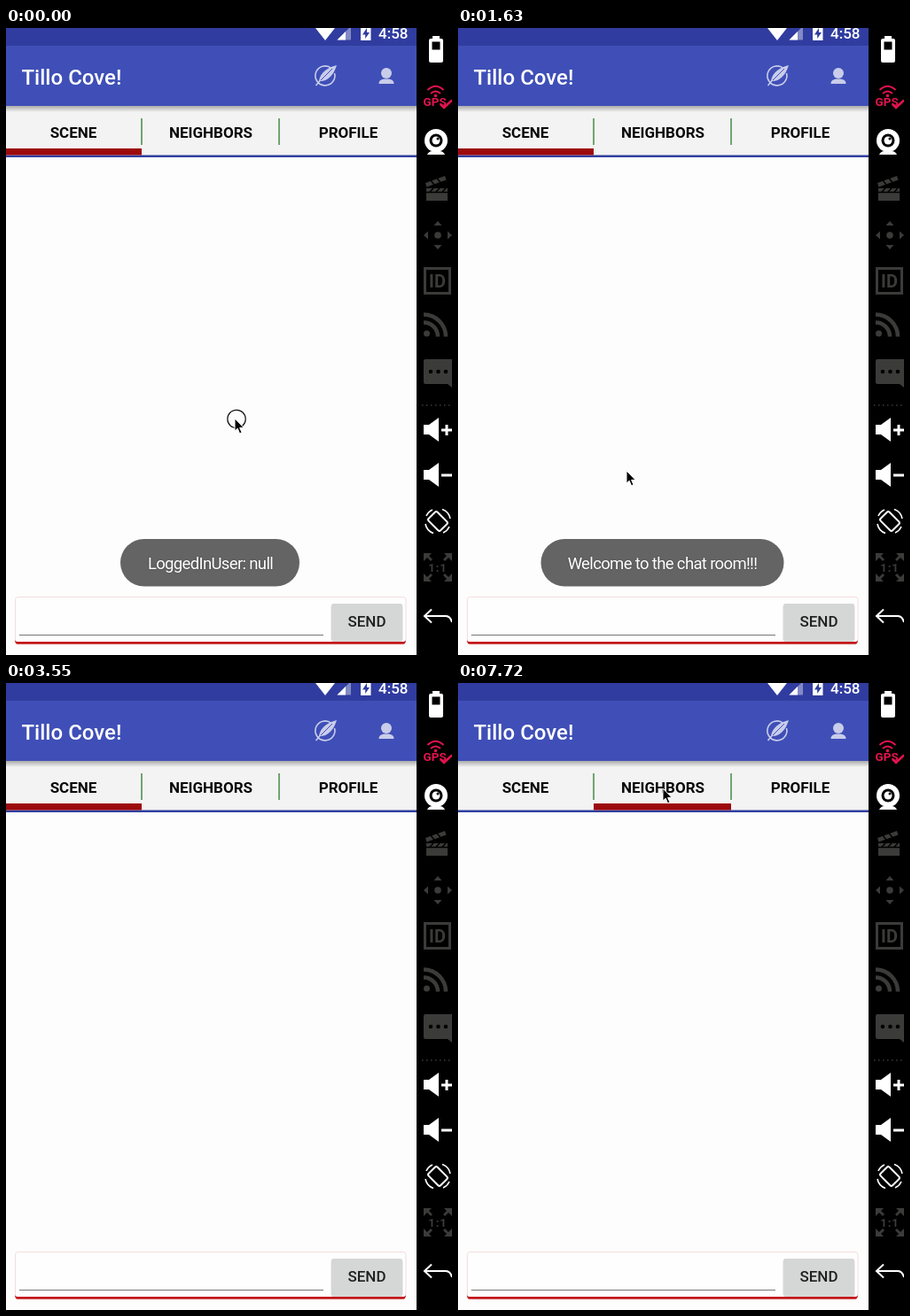
An HTML page that plays this animation: 503x708 px, repeating every 8 s.

```html
<!DOCTYPE html>
<html lang="en">
<head>
<meta charset="utf-8">
<title>Chat app</title>
<style>
  html, body { margin: 0; width: 100%; height: 100%; overflow: hidden; background: #fdfdfd; }
  svg { display: block; width: 503px; height: 708px; font-family: Roboto, "Open Sans", sans-serif; }
  .tab { font-weight: 700; font-size: 17px; text-anchor: middle; fill: #0a0a0a; }
  .toast rect { fill: #646464; }
  .toast text { font-size: 18.5px; letter-spacing: -.65px; text-anchor: middle; fill: #fff; text-shadow: 0 0 2px rgba(0,0,0,.35); }
  .line { fill: none; stroke: currentColor; }
  .white { color: #fff; fill: #fff; }
  .dim { color: #3b3b39; fill: #3b3b39; }
</style>
</head>
<body>
<svg viewBox="0 0 503 708">
  <defs>
    <linearGradient id="drop" x2="0" y2="1">
      <stop offset="0" stop-color="#000" stop-opacity=".3"/>
      <stop offset="1" stop-color="#000" stop-opacity="0"/>
    </linearGradient>
    <path id="speaker" d="M471 -6h6l11 -8v27l-11 -8h-6z"/>
    <path id="tri" d="M-4.5 -11L0 -16L4.5 -11z"/>
  </defs>
  <rect width="463" height="708" fill="#fdfdfd"/>

  <!-- tabs -->
  <rect y="88" width="463" height="56" fill="#f3f3f3"/>
  <rect id="press" x="153" y="88" width="155" height="56" fill="#000" opacity="0"/>
  <rect y="143.5" width="463" height="2.5" fill="#303f9f"/>
  <rect id="bar" y="136" width="153" height="7.5" fill="#9c0a0c"/>
  <path d="M153 102v30M308 102v30" stroke="#4f9152" stroke-width="1.6"/>
  <text class="tab" x="76" y="124">SCENE</text>
  <text class="tab" x="231" y="124">NEIGHBORS</text>
  <text class="tab" x="386" y="124">PROFILE</text>

  <!-- app bar -->
  <rect y="88" width="463" height="7" fill="url(#drop)"/>
  <rect width="463" height="88" fill="#3f4fb7"/>
  <rect width="463" height="20" fill="#303c9f"/>
  <text x="17.5" y="64" font-size="24" font-weight="500" fill="#fff">Tillo Cove!</text>
  <g fill="#fff">
    <path d="M349 0h22l-11 14z"/>
    <path d="M389 0v13.5h-15.500l13.500 -13.500z" opacity=".4"/>
    <path d="M383 4v9.500h-9.500z"/>
    <path d="M400 0h11.500v14h-11.500z"/>
    <path d="M407 0l-5 7.500h3.200v4.500l4.800 -7h-3z" fill="#303c9f"/>
    <text x="420" y="12" font-size="17" font-weight="500">4:58</text>
  </g>
  <g fill="#c9cdea" color="#c9cdea">
    <path class="line" d="M367 45.500A11 11 0 1 0 370.500 51" stroke-width="1.6"/>
    <path d="M373 42C364 44 354 50 353 60C361 61 369 55 373 42z"/>
    <path class="line" d="M349.500 65L356 57" stroke-width="1.6"/>
    <path d="M355 59L368 46" stroke="#3f4fb7" stroke-width="1"/>
    <circle cx="429" cy="51" r="6"/>
    <path d="M420.500 63c0 -4 3 -5.500 8.500 -5.500s8.500 1.500 8.500 5.500z"/>
    <path class="line" d="M425 52q4 5 8 0" stroke="#3f4fb7"/>
  </g>

  <!-- message box -->
  <rect x="10.500" y="642.500" width="440.500" height="52" rx="3" fill="#fefefe" stroke="#f5dcdc"/>
  <path d="M10 690q0 5.800 3 5.800h435q3 0 3 -5.800q0 3 -3 3h-435q-3 0 -3 -3z" fill="#c4161a"/>
  <path d="M15 685.500h343" stroke="#777"/>
  <rect x="366.500" y="651" width="81" height="42" rx="3" fill="#000" opacity=".15"/>
  <rect x="367" y="650" width="80" height="41" rx="2" fill="#d5d7d6"/>
  <text x="407" y="676" font-size="17" font-weight="500" text-anchor="middle" fill="#202020">SEND</text>

  <g class="toast" id="login">
    <rect x="129" y="577" width="202" height="53.500" rx="26.700"/>
    <text x="230.500" y="611">LoggedInUser: null</text>
  </g>
  <g class="toast" id="hello">
    <rect x="93.500" y="577" width="274" height="53.500" rx="26.700"/>
    <text x="230.500" y="611">Welcome to the chat room!!!</text>
  </g>

  <!-- device controls -->
  <rect x="463" width="40" height="708"/>
  <g class="white">
    <rect x="481" y="9" width="8" height="4"/>
    <rect x="477" y="12" width="16" height="27" rx="2"/>
    <rect x="480.500" y="15.500" width="9" height="9" fill="#000"/>
    <circle cx="485" cy="127" r="13"/>
    <circle cx="485" cy="127" r="7.500" fill="#000"/>
    <circle cx="485" cy="127" r="4.500"/>
    <circle cx="487" cy="125" r="1.500" fill="#000"/>
    <path d="M475 143q2 -4 6 -4h8q4 0 6 4z"/>
    <use href="#speaker" y="454"/>
    <path class="line" d="M491 454h12M497 448v12M491 505h12" stroke-width="3"/>
    <use href="#speaker" y="505"/>
    <g class="line" stroke-width="2">
      <rect x="480" y="547.500" width="14" height="19" rx="2" transform="rotate(-45 487 557)"/>
      <path d="M473 560a14 14 0 0 0 9 10.500M501 554a14 14 0 0 0 -9 -10.500M474 551a14 14 0 0 1 7 -7M500 563a14 14 0 0 1 -7 7" stroke-width="1.600"/>
      <path d="M480 656.500l-8 7.500l8 7.500M472 664h24q5 0 7 7"/>
    </g>
  </g>
  <g fill="#e3134f" color="#e3134f">
    <path class="line" d="M475.500 70q9 -8.500 18 0M479 74q5.500 -5 11 0" stroke-width="2"/>
    <circle cx="484.500" cy="76.500" r="1.800"/>
    <text x="470.500" y="88" font-size="13.500" font-weight="700">GPS</text>
    <path class="line" d="M490 86l4 4l9 -8.500" stroke="#9fc31a" stroke-width="2.600"/>
  </g>
  <g class="dim">
    <path d="M474 181h24v14h-24zM473 175l22 -8l1.500 4.500l-22 8z"/>
    <path d="M479 172l4 5M486 169.500l4 5M478 185l4 -4M485 185l4 -4M492 185l4 -4M474 185.500h24" stroke="#000" stroke-width="1.500"/>
    <g transform="translate(487 234)">
      <circle r="3.800"/>
      <use href="#tri"/>
      <use href="#tri" transform="rotate(90)"/>
      <use href="#tri" transform="rotate(180)"/>
      <use href="#tri" transform="rotate(270)"/>
    </g>
    <rect class="line" x="472.500" y="271.500" width="28" height="28" stroke-width="3"/>
    <text x="486.500" y="293" font-size="20" font-weight="700" text-anchor="middle">ID</text>
    <circle cx="474.500" cy="345" r="3.500"/>
    <path class="line" d="M471 332.500a16 16 0 0 1 16 16M471 323.500a25 25 0 0 1 25 25" stroke-width="4.500"/>
    <path d="M473 374h30v32l-5 -4h-25q-2 0 -2 -2v-24q0 -2 2 -2z"/>
    <g fill="#000">
      <circle cx="479" cy="388" r="2.300"/><circle cx="487.500" cy="388" r="2.300"/><circle cx="496" cy="388" r="2.300"/>
    </g>
    <path class="line" d="M469 426h34" stroke-width="1.500" stroke-dasharray="1.500 3.500"/>
    <path d="M471 593h9l-3 3l4 4l-2 2l-4 -4l-4 4zM503 593h-9l3 3l-4 4l2 2l4 -4l4 4zM471 625h9l-3 -3l4 -4l-2 -2l-4 4l-4 -4zM503 625h-9l3 -3l-4 -4l2 -2l4 4l4 -4z"/>
    <text x="487" y="614" font-size="13" font-weight="700" text-anchor="middle" letter-spacing="1">1:1</text>
  </g>

  <g id="mouse">
    <circle id="tap" cx="2" cy=".5" r="10.200" fill="none" stroke="#111" stroke-width="1.200"/>
    <path d="M0 0v14.200l3.200 -3l2.300 5.600l2.500 -1l-2.400 -5.400h4.600z" fill="#000" stroke="#fff" stroke-width="1"/>
  </g>
</svg>
<script>
const LOOP = 8000;
const $ = id => document.getElementById(id);

// Each row: start time, then values held until the next row.
const mouse = [
  [0, 258, 441], [150, 244, 475], [300, 224, 499], [450, 205, 452], [590, 189, 390],
  [1190, 179, 369], [1340, 180, 387], [1490, 184, 432], [1630, 190, 500],
  [1780, 196, 570], [1930, 201, 630], [2070, 204, 665], [2220, 205, 680],
  [2370, 180, 672], [2520, 147, 664], [2660, -50, -50],
  [6240, 113, 674], [6390, 117, 652], [6540, 132, 580], [6680, 156, 465],
  [6830, 184, 330], [6980, 208, 215], [7120, 225, 142], [7270, 231, 119]
];
const tap = [[0, 1], [150, 0], [7270, 1], [7420, 0]];
const login = [[0, 1], [1190, .96], [1340, .65], [1490, .2], [1630, 0]];
const hello = [[0, 0], [1190, .19], [1340, .65], [1490, .93], [1630, 1],
  [3250, .85], [3400, .35], [3550, 0]];
const bar = [[0, 0, 153], [7570, 92, 154], [7720, 153, 155]];
const press = [[0, 0], [7570, .08], [7720, 0]];

const at = (rows, t) => rows.findLast(r => r[0] <= t).slice(1);
const fade = (id, rows, t) => $(id).setAttribute("opacity", at(rows, t)[0]);

function draw(t) {
  $("mouse").setAttribute("transform", `translate(${at(mouse, t)})`);
  fade("tap", tap, t);
  fade("login", login, t);
  fade("hello", hello, t);
  fade("press", press, t);
  const [x, w] = at(bar, t);
  $("bar").setAttribute("x", x);
  $("bar").setAttribute("width", w);
}

const start = performance.now();
function tick() {
  draw((performance.now() - start) % LOOP);
  requestAnimationFrame(tick);
}
tick();
</script>
</body>
</html>
```
